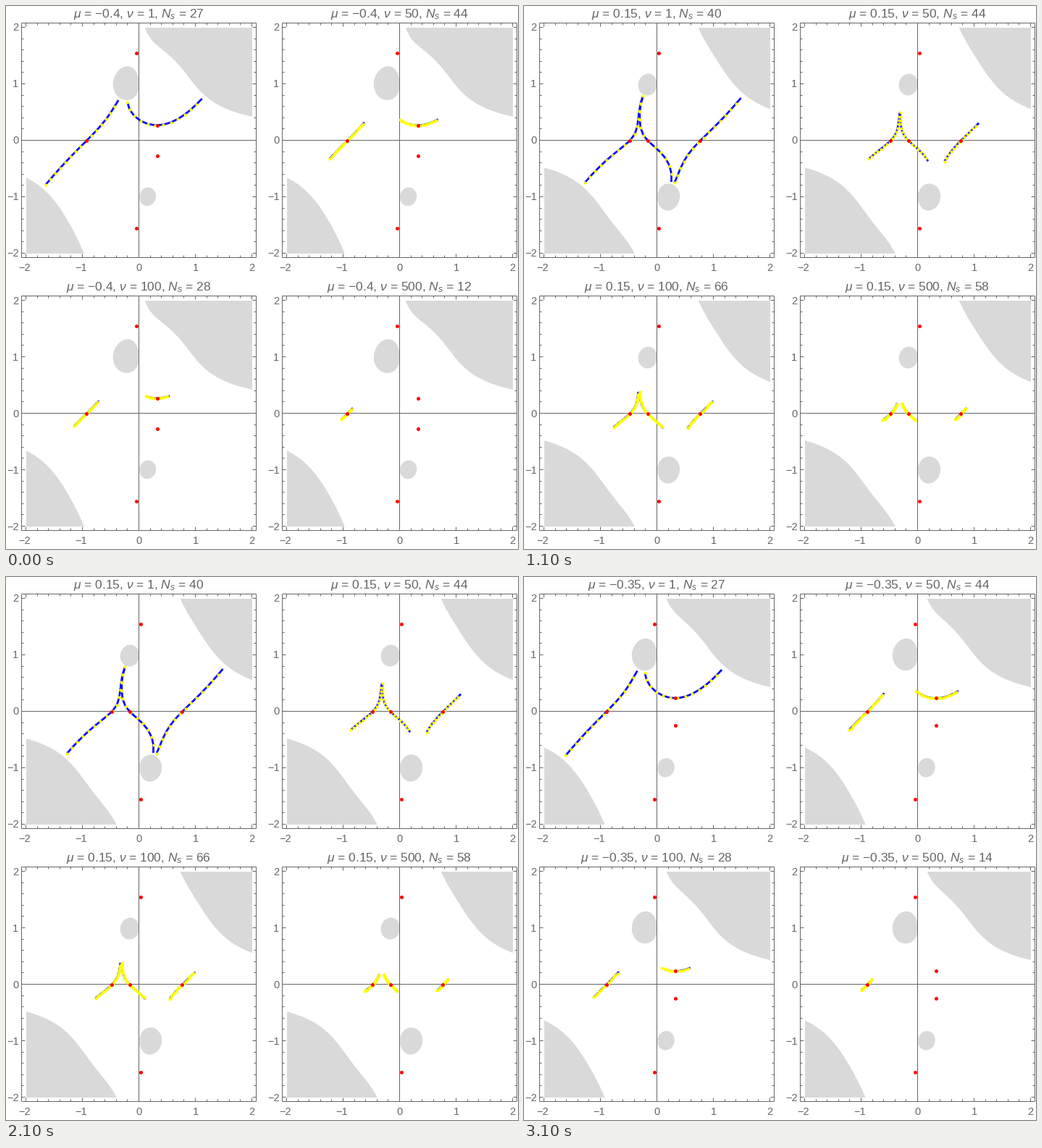
These frames come from a looping animation (707 px wide and 750 px high, 3.2 s). A matplotlib script:

```python
import numpy as np
import matplotlib.pyplot as plt
from matplotlib.animation import FuncAnimation
from matplotlib.collections import LineCollection

W, H, DPI = 707, 750, 100
UNIT = 78            # pixels per unit
HALF = 162           # half side of a panel in pixels
DEPTH = 1.91         # height beyond which the plane is shaded
ALPHA = 2.0
INK = "#666666"
STEPS = 16           # mu runs from -0.4 to 0.4 and back
PT = 72 / DPI        # points per pixel

plt.rcParams.update({
    "font.family": "Liberation Sans",
    "mathtext.fontset": "custom",
    "mathtext.rm": "Liberation Sans",
    "mathtext.it": "Liberation Sans:italic",
})

# Segment counter at a few key values of mu, eased linearly between them
MU_KEYS = [-0.4, -0.35, -0.15, -0.05, 0.15, 0.3]
COUNT_KEYS = {
    1: [27, 27, 40, 42, 40, 28],
    50: [44, 44, 44, 84, 44, 26],
    100: [28, 28, 66, 62, 66, 36],
    500: [12, 14, 58, 52, 58, 8],
}


def phase(z, mu):
    return (z - mu) ** 2 + ALPHA / (1 + z * z)


def slope(z, mu):
    return 2 * (z - mu) - 2 * ALPHA * z / (1 + z * z) ** 2


def curvature(z):
    return 2 - 2 * ALPHA * (1 - 3 * z * z) / (1 + z * z) ** 3


def saddles(mu):
    return np.roots([1, -mu, 2, -2 * mu, 1 - ALPHA, -mu])


def descend(z0, d, mu, ds=0.005):
    """Follow the steepest descent path from a saddle in direction d."""
    def go(z):
        g = 1j * np.conj(slope(z, mu))
        return g / abs(g)

    z = z0 + ds * d
    path = [z0, z]
    while phase(z, mu).imag < DEPTH and len(path) < 500:
        k1 = go(z)
        k2 = go(z + ds / 2 * k1)
        k3 = go(z + ds / 2 * k2)
        k4 = go(z + ds * k3)
        z = z + ds / 6 * (k1 + 2 * k2 + 2 * k3 + k4)
        path.append(z)
    return np.array(path)


def thimbles(mu, roots):
    """Full paths, left to right, through the saddles that contribute."""
    inner = [complex(r) for r in roots if abs(r.imag) < 1]
    used = [s for s in inner
            if abs(s.imag) < 1e-5 or phase(s, mu).imag > 0]
    paths = []
    for s in sorted(used, key=lambda r: r.real):
        d = np.sqrt(1j / curvature(s))
        d /= abs(d)
        if d.real < 0:
            d = -d
        left, right = descend(s, -d, mu), descend(s, d, mu)
        paths.append((s, np.concatenate([left[::-1], right[1:]])))
    return paths


def sample(path, n):
    s = np.concatenate([[0], np.cumsum(np.abs(np.diff(path)))])
    t = np.linspace(0, s[-1], n + 1)
    return np.interp(t, s, path.real) + 1j * np.interp(t, s, path.imag)


def chains(mu, nu, paths):
    """Segment end points of every visible thimble, and the segment count."""
    reach = min(1.65, 15 / nu)
    total = int(round(np.interp(mu, MU_KEYS, COUNT_KEYS[nu])))
    lines = [p[phase(p, mu).imag <= reach] for s, p in paths
             if phase(s, mu).imag < 0.8 * reach]
    size = [np.abs(np.diff(p)).sum() for p in lines]
    share = [max(1, int(round(total * v / sum(size)))) for v in size]
    return [sample(p, n) for p, n in zip(lines, share)], total


fig = plt.figure(figsize=(W / DPI, H / DPI), dpi=DPI, facecolor="white")
ax = fig.add_axes([0, 0, 1, 1])
ax.set(xlim=(0, W), ylim=(H, 0))
ax.axis("off")


def label(x, y, text, size, ha):
    return ax.text(x, y, text, fontsize=size * PT, color=INK, ha=ha,
                   va="baseline")


def minus(text):
    return text.replace("-", "\u2212")


def dots(color, size, z):
    return ax.plot([], [], "o", color=color, ms=size * PT, mew=0, zorder=z,
                   snap=False)[0]


class Panel:
    def __init__(self, cx, cy, nu):
        self.cx, self.cy, self.nu = cx, cy, nu
        self.draw_frame()
        self.title = label(cx - 0.5, cy - 169.5, "", 17.4, "center")
        self.blue = [ax.plot([], [], color="#0000ff", lw=2.7 * PT, zorder=3,
                             solid_capstyle="butt")[0] for _ in range(3)]
        self.yellow = dots("#ffff00", 4.2, 4)
        self.red = dots("#ff0000", 5, 5)
        self.shade = None

    def draw_frame(self):
        cx, cy = self.cx, self.cy
        l, r, t, b = cx - HALF, cx + HALF, cy - HALF, cy + HALF
        lines = [[(l, t), (r, t)], [(l, b), (r, b)], [(l, t), (l, b)],
                 [(r, t), (r, b)], [(cx, t), (cx, b)], [(l, cy), (r, cy)]]
        for k in range(-10, 11):
            size = 3 if k % 5 else 5
            x = np.floor(cx + k * UNIT / 5) + 0.5
            y = np.floor(cy - k * UNIT / 5) + 0.5
            lines += [[(x, b), (x, b - size)], [(x, t), (x, t + size)],
                      [(l, y), (l + size, y)], [(r, y), (r - size, y)]]
        art = LineCollection(lines, colors=INK, linewidths=PT, zorder=2)
        art.set_snap(False)
        ax.add_collection(art, autolim=False)
        for v in range(-2, 3):
            text = minus(str(v))
            label(cx + v * UNIT - (2 if v < 0 else 0), cy + 180.5,
                  text, 14.5, "center")
            label(cx - 166, cy - v * UNIT + 5, text, 14.5, "right")

    def place(self, z):
        return self.cx + 0.5 + UNIT * z.real, self.cy + 0.5 - UNIT * z.imag

    def show(self, mu, height, roots, paths):
        if self.shade is not None:
            self.shade.remove()
        self.shade = ax.contourf(*self.place(PLANE), height, [DEPTH, 100],
                                 colors=["#d9d9d9"], zorder=1,
                                 antialiased=True)
        lines, total = chains(mu, self.nu, paths)
        for k, art in enumerate(self.blue):
            p = lines[k] if k < len(lines) else np.array([])
            art.set_data(*self.place(p))
        self.yellow.set_data(
            *self.place(np.concatenate([p[:-1] for p in lines])))
        self.red.set_data(*self.place(roots))
        value = minus(f"{mu:g}") if mu else "0."
        self.title.set_text(rf"$\mu$ = {value}, $\nu$ = {self.nu}, "
                            rf"$N_s$ = {total}")


GRID = np.linspace(-2, 2, 301)
PLANE = GRID[None, :] + 1j * GRID[:, None]
PANELS = [Panel(183.5, 185.5, 1), Panel(543.5, 185.5, 50),
          Panel(183.5, 562.5, 100), Panel(543.5, 562.5, 500)]


def update(i):
    k = STEPS - abs(STEPS - i)
    mu = round(-0.4 + 0.05 * k, 2) + 0.0
    height = np.clip(phase(PLANE, mu).imag, -8, 8)
    roots = saddles(mu)
    paths = thimbles(mu, roots)
    for panel in PANELS:
        panel.show(mu, height, roots, paths)
    ax.set(xlim=(0, W), ylim=(H, 0))
    return []


anim = FuncAnimation(fig, update, frames=2 * STEPS, interval=100,
                     repeat=True, repeat_delay=0, blit=False)
plt.show()
```
